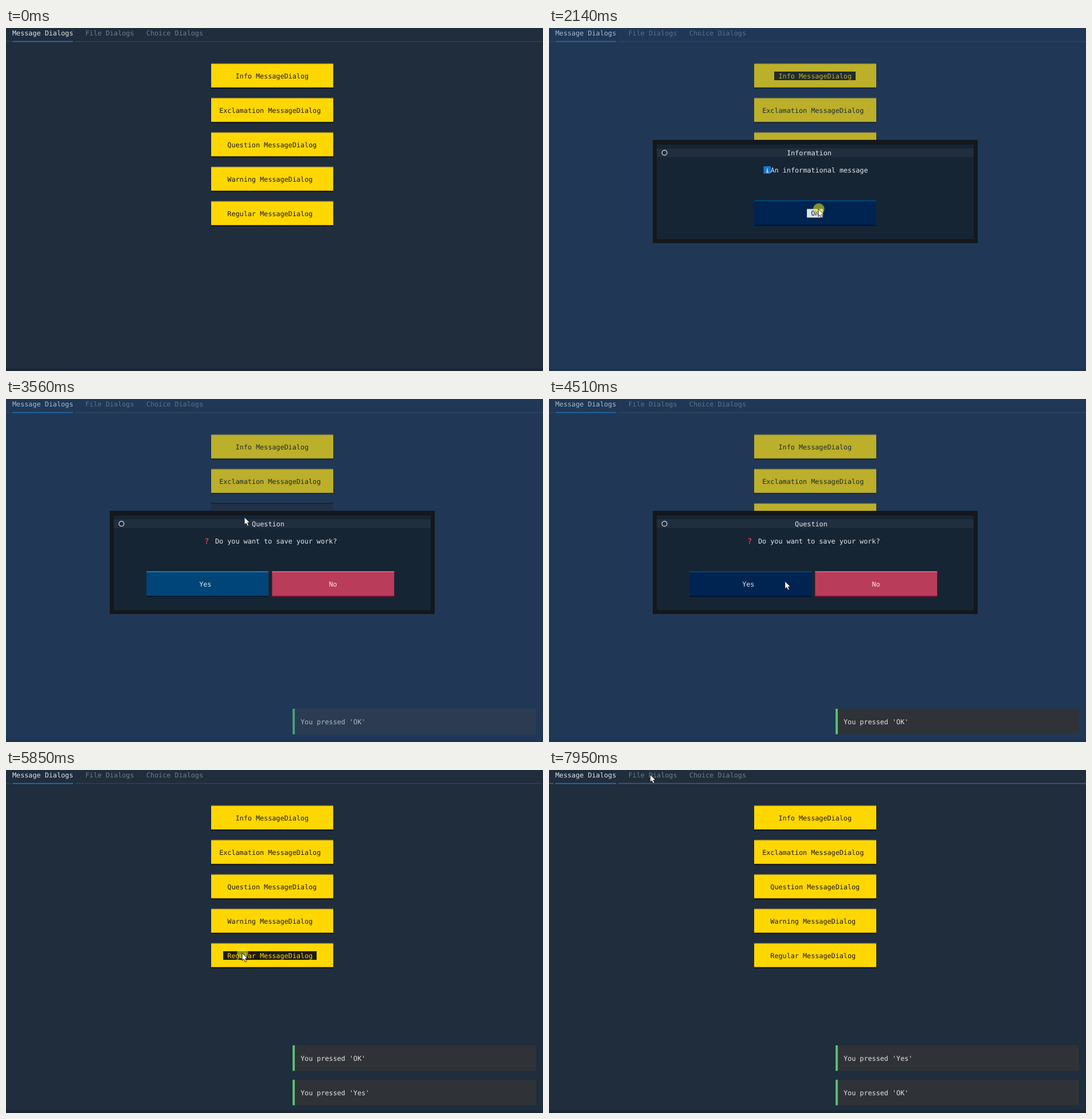
Recreate the animation shown at these times as an HTML page with a canvas. Size 937 by 598 pixels, loop 8000 ms.

```html
<!DOCTYPE html>
<html lang="en">
<head>
<meta charset="utf-8">
<title>Dialog demo</title>
<style>
  html, body { margin: 0; width: 100%; height: 100%; overflow: hidden; background: #1f2d3d; }
  canvas { display: block; }
</style>
</head>
<body>
<canvas id="stage" width="937" height="598"></canvas>
<script>
const ctx = document.getElementById('stage').getContext('2d');
const LOOP = 8000;
const CELL = 7.087;
const FONT = '11.77px "DejaVu Sans Mono", "Noto Sans Mono", monospace';

const between = (t, a, b) => t >= a && t < b;

function rect(x, y, w, h, color) {
  ctx.fillStyle = color;
  ctx.fillRect(x, y, w, h);
}

function text(str, x, mid, color, font = FONT) {
  ctx.font = font;
  ctx.fillStyle = color;
  ctx.fillText(str, x, mid + 4.3);
}

// Button looks: fill, top line, bottom line, text, label box
const LOOK = {
  gold: ['#ffd700', '#4b4a3a', '#0b0c0e', '#1e1b07'],
  goldFocus: ['#ffd700', '#4b4a3a', '#0b0c0e', '#ffd700', '#1e1b07'],
  goldDown: ['#212326', '#090a0b', '#3a3c3f', '#212326', '#9d9d9d'],
  blue: ['#004578', '#3b7fb8', '#00162e', '#dde6ee'],
  blueHover: ['#002451', '#004f86', '#001330', '#dde3ea'],
  blueFocus: ['#002451', '#004f86', '#001330', '#002451', '#dde3ea'],
  blueDown: ['#04335a', '#00172d', '#356a9c', '#04335a', '#a2a9b0'],
  red: ['#b93c5b', '#e4718c', '#780d30', '#f3e2e7']
};

function button(x, y, label, look) {
  const [fill, top, bottom, ink, box] = LOOK[look];
  const w = 213, mid = y + 22;
  rect(x, y, w, 44, fill);
  rect(x, y, w, 1.5, top);
  rect(x, y + 42.7, w, 1.8, bottom);
  const tx = x + (Math.floor((28 - label.length) / 2) + 1) * CELL;
  if (box) rect(Math.round(tx - CELL), mid - 7, Math.round((label.length + 2) * CELL), 15, box);
  text(label, tx, mid + 0.4, ink);
}

const MENU = ['Info', 'Exclamation', 'Question', 'Warning', 'Regular'];

// Presses on the menu: button, focus, press, release, focus lost
const PRESSES = [
  ['Info', 1120, 1190, 1400, 2880],
  ['Question', 3420, 3490, 3700, 5850],
  ['Regular', 5850, 5920, 6130, 7880]
];

const DIALOGS = [
  { from: 1260, to: 2340, click: 2140, title: 'Information', body: 'An informational message', x: 386.5, icon: 'i', ok: 'OK' },
  { from: 3560, to: 5040, click: 4910, title: 'Question', body: 'Do you want to save your work?', x: 365, icon: '?', ok: 'Yes', cancel: 'No' },
  { from: 5990, to: 6740, click: 6600, title: 'Regular', body: 'Do you want to continue?', x: 379.5, ok: 'OK', cancel: 'Cancel' }
];

const TOASTS = [['OK', 2410, 7380], ['Yes', 5110, LOOP], ['OK', 6810, LOOP]];
const CLICKS = [[1120, 1190], [2140, 2270], [3420, 3490], [4910, 4980], [5850, 5920], [6600, 6670]];

// Pointer stops: time, x, y
const PATH = [
  [330, 866, 583], [1050, 475, 76], [1330, 475, 76], [1940, 470, 315.5],
  [2340, 470, 315.5], [3000, 416, 206], [3640, 416, 206], [4440, 412, 318],
  [4570, 411, 317], [4910, 412, 318], [5110, 412, 318], [5500, 414, 321],
  [5850, 412, 319], [6230, 411.5, 322.5], [6800, 411.5, 322.5],
  [7300, 411, 315], [7870, 176.5, 8]
];

function pointerAt(t) {
  const s = Math.max(330, Math.floor(t / 70) * 70);
  const i = PATH.findIndex(p => p[0] > s);
  if (i < 0) return PATH[PATH.length - 1].slice(1);
  const [t0, x0, y0] = PATH[i - 1], [t1, x1, y1] = PATH[i];
  const u = (s - t0) / (t1 - t0), e = u * u * (3 - 2 * u);
  return [x0 + (x1 - x0) * e, y0 + (y1 - y0) * e];
}

function drawPage(t) {
  rect(0, 0, 937, 598, '#1f2d3d');
  rect(0, 593.5, 937, 5, '#1b2735');
  text('Message Dialogs', 11, 8.5, '#e0e4e7');
  text('File Dialogs', 138.5, 8.5, '#737d87');
  text('Choice Dialogs', 244.8, 8.5, '#737d87');
  const rule = t >= 7880 ? '#4a5967' : '#30414f';
  rect(0, 22.7, 8, 1.7, rule);
  rect(121, 22.7, 816, 1.7, rule);
  rect(11, 22.7, 106, 1.7, '#1f75b9');

  MENU.forEach((name, i) => {
    let look = 'gold';
    for (const [who, focus, down, up, blur] of PRESSES) {
      if (who !== name || !between(t, focus, blur)) continue;
      look = between(t, down, up) ? 'goldDown' : 'goldFocus';
    }
    button(358, 61 + i * 60, name + ' MessageDialog', look);
  });
}

function drawToasts(t) {
  const live = TOASTS.filter(([, a, b]) => between(t, a, b));
  live.forEach(([name], i) => {
    const y = 540 - (live.length - 1 - i) * 60;
    rect(500, y, 425, 44.5, '#2f3237');
    rect(500, y, 4, 44.5, '#56be74');
    text(`You pressed '${name}'`, 514, y + 22.4, '#e3e4e5');
  });
}

function drawDialog(d, t, [px, py]) {
  rect(0, 0, 937, 598, 'rgba(33, 85, 141, 0.3)');
  rect(181, 195, 567, 180, '#14181c');
  rect(188, 203, 553, 165, '#162534');
  rect(188, 210, 553, 15, '#212e3e');
  ctx.strokeStyle = '#dfe3e7';
  ctx.lineWidth = 1.2;
  ctx.beginPath();
  ctx.arc(201.5, 217.5, 4.4, 0, 7);
  ctx.stroke();
  text(d.title, 188.1 + Math.floor((76 - d.title.length) / 2) * CELL, 217.8, '#e3e7ea');
  if (d.icon === 'i') {
    rect(374.5, 241, 12.5, 13, '#1677cf');
    text('i', 378.2, 247.2, '#fff', 'bold 9px "DejaVu Sans Mono", monospace');
  } else if (d.icon) {
    text('?', 346, 248.3, '#d9304f', 'bold 14px "DejaVu Sans Mono", monospace');
  }
  text(d.body, d.x, 247.8, '#e3e7ea');

  const x = d.cancel ? 245 : 358;
  const over = px >= x && px < x + 213 && py >= 300 && py < 345;
  const held = d.title === 'Information' ? 130 : 70;
  let look = over ? 'blueHover' : 'blue';
  if (t >= d.click) look = t >= d.click + held ? 'blueDown' : 'blueFocus';
  button(x, 300.5, d.ok, look);
  if (d.cancel) button(464.3, 300.5, d.cancel, 'red');
}

function drawPointer(t, [x, y]) {
  if (CLICKS.some(([a, b]) => between(t, a, b))) {
    ctx.fillStyle = 'rgba(235, 235, 20, 0.55)';
    ctx.beginPath();
    ctx.arc(x + 0.8, y, 9.8, 0, 7);
    ctx.fill();
  }
  ctx.save();
  ctx.translate(x, y);
  ctx.beginPath();
  ctx.moveTo(0, 0);
  for (const [a, b] of [[0, 13.2], [3, 10.6], [5.2, 15.4], [7.6, 14.3], [5.5, 9.7], [9.6, 9.7]]) ctx.lineTo(a, b);
  ctx.closePath();
  ctx.fillStyle = '#fff';
  ctx.fill();
  ctx.strokeStyle = '#111';
  ctx.lineWidth = 0.9;
  ctx.stroke();
  ctx.restore();
}

function draw(t) {
  const tip = pointerAt(t);
  const dialog = DIALOGS.find(d => between(t, d.from, d.to));
  // A toast stays under the tint until the new screen repaints it
  const under = dialog && t < dialog.from + 70;
  drawPage(t);
  if (under) drawToasts(t);
  if (dialog) drawDialog(dialog, t, tip);
  if (!under) drawToasts(t);
  if (t >= 330) drawPointer(t, tip);
}

ctx.textRendering = 'geometricPrecision';

function frame() {
  draw(performance.now() % LOOP);
  requestAnimationFrame(frame);
}
frame();
</script>
</body>
</html>
```
